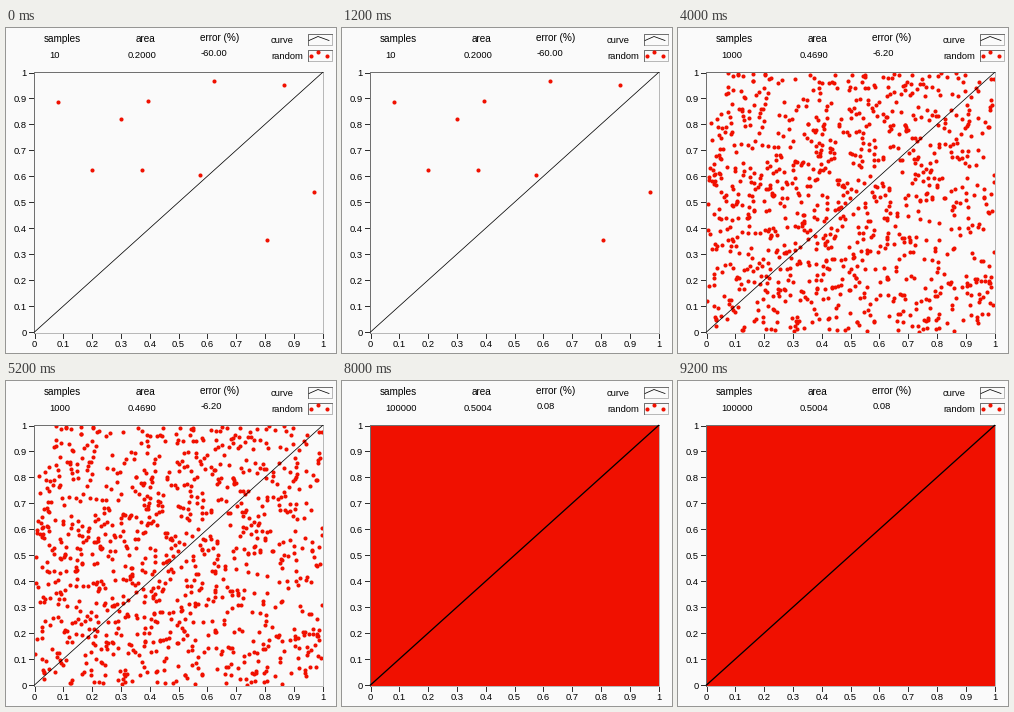
Animation of 330x325 px, one loop 10000 ms. Source, as a matplotlib script:

```python
import numpy as np
import matplotlib.pyplot as plt
from matplotlib.animation import FuncAnimation
from matplotlib.patches import Rectangle

W, H, DPI = 330, 325, 100
PX = 72 / DPI
X0, X1, Y0, Y1 = 28.5, 316.5, 304.0, 44.5
RED, INK, PAPER = "#f01000", "#000000", "#fafafa"

# Measured share of samples under y = x; the count grows tenfold each run
AREAS = [0.2000, 0.4100, 0.4690, 0.4911, 0.5004]

# The few samples of the first run, in unit coordinates
FIRST = [(.082, .888), (.200, .624), (.302, .819), (.394, .892), (.372, .624),
         (.623, .967), (.575, .605), (.868, .952), (.806, .355), (.969, .540)]


def to_stage(x, y):
    return X0 + (X1 - X0) * x, Y0 + (Y1 - Y0) * y


def samples(n, area):
    """n random points in the unit square, a share of `area` under y = x."""
    if n == len(FIRST):
        return np.array(FIRST)
    uv = np.sort(np.random.default_rng(n).random((n, 2)), axis=1)
    under = round(n * area)
    uv[:under] = uv[:under, ::-1]
    return uv


fig = plt.figure(figsize=(W / DPI, H / DPI), dpi=DPI, facecolor=PAPER)
ax = fig.add_axes([0, 0, 1, 1])
ax.set(xlim=(0, W), ylim=(H, 0))
ax.axis("off")


def line(xs, ys, color=INK, width=1.0, **kw):
    return ax.plot(xs, ys, color=color, lw=width * PX, **kw)[0]


def dots(xs, ys, size=4.1, **kw):
    return ax.plot(xs, ys, "o", ms=size * PX, mfc=RED, mec="none", **kw)[0]


def text(x, y, s="", size=9.4, ha="left"):
    return ax.text(x, y, s, fontsize=size * PX, family="Liberation Sans",
                   color=INK, ha=ha, va="baseline")


def box(x0, y0, x1, y1, **kw):
    line([x0, x1, x1], [y1, y1, y0], "#b8b8b8", **kw)
    line([x0, x0, x1], [y1, y0, y0], "#707070", **kw)


# Plot frame and scales
box(27.5, 43.5, 316.5, 304.5, zorder=6)
for i in range(11):
    x, y = to_stage(i / 10, i / 10)
    label = f"{i / 10:g}"
    line([x, x], [306, 310], "#303030")
    line([23, 27], [y, y], "#303030")
    text(x, 319, label, ha="center")
    text(21, y + 3.5, label, ha="right")

# Readouts
for x, y, s in [(38, 14, "samples"), (129.5, 14, "area"),
                (193.5, 13, "error (%)")]:
    text(x, y, s, 10)
count, area_val, error = text(43.5, 30), text(121.5, 30), text(195, 28.5)

# Legend
text(265, 15, "curve")
text(265, 31, "random")
box(301.5, 5.5, 325.5, 16.5)
box(301.5, 21.5, 325.5, 32.5)
line([303, 312, 323], [12.5, 8.5, 12.5], width=0.75)
dots([304.5, 312, 320.5], [27.5, 24, 27.5])

# Samples with the curve over them
cloud = dots([], [], zorder=5)
cloud.set_clip_path(Rectangle((28, 44), 289, 261, transform=ax.transData))
curve = line([X0, X1], [Y0, Y1], zorder=7)

runs = [(10 ** (i + 1), area) for i, area in enumerate(AREAS)]
clouds = [to_stage(*samples(n, area).T) for n, area in runs]


def draw(i):
    n, area = runs[i]
    cloud.set_data(*clouds[i])
    curve.set_linewidth((1.3 if n > 1000 else 0.75) * PX)
    count.set_text(str(n))
    area_val.set_text(f"{area:.4f}")
    error.set_text(f"{(area - 0.5) / 0.5 * 100:.2f}")
    return cloud, curve, count, area_val, error


anim = FuncAnimation(fig, draw, frames=len(runs), interval=2000,
                     repeat=True, repeat_delay=0, blit=False)
plt.show()
```
